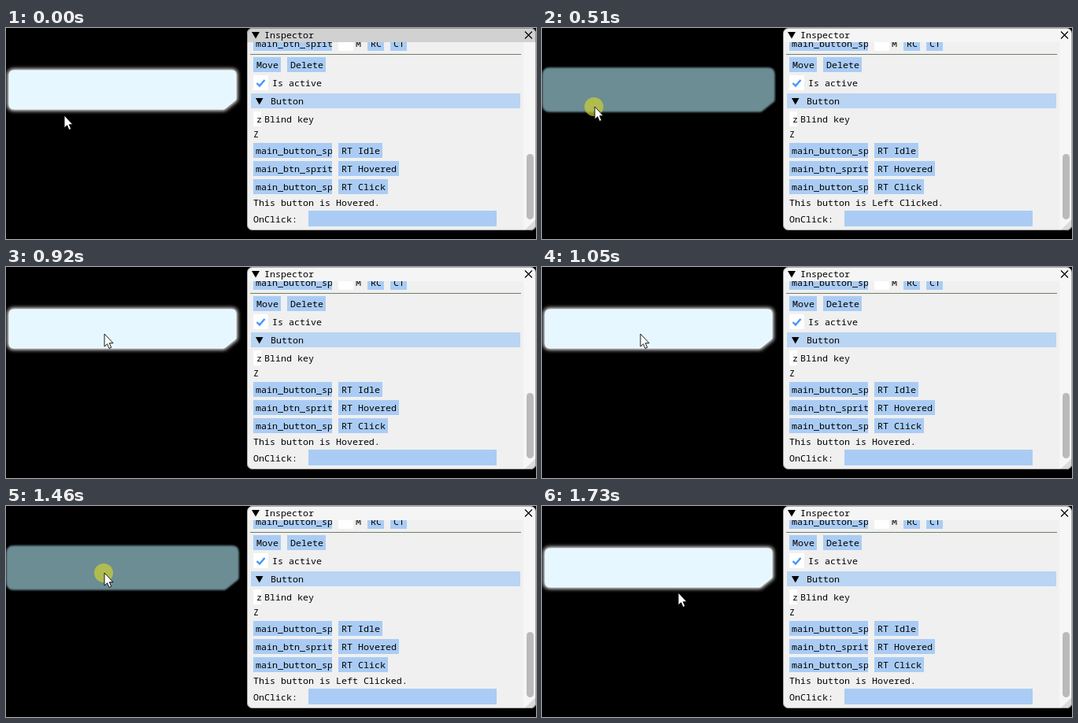
Write an HTML page that moves like this. It is 673x268 px and loops after 1780 ms.

```html
<!DOCTYPE html>
<html lang="en">
<head>
<meta charset="utf-8">
<title>Button inspector</title>
<style>
  html, body { margin: 0; width: 100%; height: 100%; overflow: hidden; background: #000; }
  svg { display: block; width: 673px; height: 268px; }
  text { font: 11.67px "Noto Sans Mono", monospace; fill: #000; white-space: pre; }
  .pressed { opacity: 0; }
</style>
</head>
<body>
<svg viewBox="0 0 673 268">
  <defs>
    <filter id="glow" x="-5%" y="-30%" width="110%" height="160%"><feGaussianBlur stdDeviation="2.6"/></filter>
    <filter id="soft" x="-5%" y="-30%" width="110%" height="160%"><feGaussianBlur stdDeviation="1"/></filter>
    <clipPath id="frame"><rect x="306" width="367" height="257" rx="7"/></clipPath>
    <clipPath id="body"><rect x="306" y="18" width="367" height="239"/></clipPath>
    <clipPath id="field"><rect x="314" y="18" width="100" height="239"/></clipPath>
    <path id="plate" d="M10 54H287Q292 54 292 59V91L277 103H10Q4 103 4 97V60Q4 54 10 54Z"/>
  </defs>

  <g class="idle">
    <use href="#plate" fill="#fff" stroke="#fff" stroke-width="4" filter="url(#glow)"/>
    <use href="#plate" fill="#e6f7ff" stroke="#f2fbff"/>
  </g>
  <g class="pressed">
    <use href="#plate" fill="#6c8d94" stroke="#6c8d94" stroke-width="7.5" stroke-linejoin="round" filter="url(#soft)"/>
  </g>

  <g clip-path="url(#frame)">
    <rect x="306" width="367" height="257" fill="#f0f0f0"/>
    <rect x="306" width="367" height="18" fill="#f5f5f5"/>
    <rect id="focus" x="306" width="367" height="18" fill="#d1d1d1"/>
    <path d="M312 5h10l-5 8.5z"/>
    <path d="M659 4.5l9 9m0-9l-9 9" stroke="#000" stroke-width="1.2"/>
    <rect x="657" y="18" width="16" height="239" fill="#f6f6f6"/>
    <rect x="661" y="160" width="9" height="83" rx="4.5" fill="#bababa"/>
    <path d="M673 243V257H658Z" fill="#dcdcdc"/>
    <g id="panel" clip-path="url(#body)"></g>
    <path d="M310 33.5H654" stroke="#6e7f6a"/>
    <path d="M317 89h9.5l-4.75 8.5z"/>
    <path d="M318.5 70l3.5 3.5 6.5-7.5" fill="none" stroke="#4296fa" stroke-width="2.4"/>
    <g id="labels"></g>
    <rect x="306.5" y=".5" width="366" height="256" rx="6.5" fill="none" stroke="#000" stroke-opacity=".3"/>
  </g>

  <g id="cursor">
    <circle class="pressed" cx="-1" r="12" fill="#cbce34" fill-opacity=".72"/>
    <path d="M0 0V16L3.6 12.7 6 18.4 8.7 17.3 6.3 11.7H11Z" fill="#fff" stroke="#000" stroke-width=".9"/>
  </g>
</svg>
<script>
const LOOP = 1780;
const BLUE = '#aaccf4', WHITE = '#fff', HEADER = '#bad4f3';
const panel = document.getElementById('panel');
const labels = document.getElementById('labels');

function add(parent, tag, attrs, content = '') {
  const el = document.createElementNS('http://www.w3.org/2000/svg', tag);
  for (const key in attrs) el.setAttribute(key, attrs[key]);
  el.textContent = content;
  return parent.appendChild(el);
}
const box = (x, y, width, height, fill) => add(panel, 'rect', { x, y, width, height, fill });
const label = (x, y, str, parent = labels) => add(parent, 'text', { x, y }, str);

function button(x, y, str) {
  box(x, y, str.length * 7 + 7, 19, BLUE);
  label(x + 4, y + 14, str, panel);
}
function fieldText(y, str) {
  const el = label(317, y + 14, str, panel);
  el.setAttribute('clip-path', 'url(#field)');
  return el;
}
function field(y, str) {
  box(314, y, 100, 19, BLUE);
  return fieldText(y, str);
}

const oldSprite = field(10, 'main_btn_sprite');
const newSprite = fieldText(10, 'main_button_sprite');
box(422, 10, 19, 19, WHITE);
label(444, 24, 'M', panel);
button(459, 10, 'RC');
button(488, 10, 'CT');
button(314, 37, 'Move');
button(357, 37, 'Delete');
box(314, 60, 19, 19, WHITE);
box(311, 83, 342, 19, HEADER);
box(314, 106, 10, 19, WHITE);
[['main_button_sprite', 'RT Idle'], ['main_btn_sprite', 'RT Hovered'], ['main_button_sprite', 'RT Click']]
  .forEach(([name, target], i) => {
    field(146 + 23 * i, name);
    button(422, 146 + 23 * i, target);
  });
box(384, 232, 239, 20, BLUE);

label(328, 13, 'Inspector');
label(338, 74, 'Is active');
label(336, 97, 'Button');
label(318, 120, 'z');
label(328, 120, 'Blind key');
label(314, 139, 'Z');
label(314, 247, 'OnClick:');
label(314, 226, 'This button is Hovered.').classList.add('idle');
label(314, 226, 'This button is Left Clicked.').classList.add('pressed');

function play(el, frames) {
  el.animate(frames, { duration: LOOP, iterations: Infinity }).startTime = 0;
}
// Hard switches: [time, visible]
function toggle(el, steps) {
  const frames = steps.map(([t, on]) => ({ offset: t / LOOP, opacity: on, easing: 'step-end' }));
  play(el, [...frames, { offset: 1, opacity: steps.at(-1)[1] }]);
}
const CLICK = 420;
const presses = [[0, 0], [CLICK, 1], [660, 0], [1130, 1], [1510, 0]];
document.querySelectorAll('.pressed').forEach(el => toggle(el, presses));
document.querySelectorAll('.idle').forEach(el => toggle(el, presses.map(([t, on]) => [t, 1 - on])));

// The first click also takes the focus from the panel
toggle(document.getElementById('focus'), [[0, 1], [CLICK, 0]]);
toggle(oldSprite, [[0, 1], [CLICK, 0]]);
toggle(newSprite, [[0, 0], [CLICK, 1]]);

// Pointer path: [time, x, y]
const path = [[0, 74, 111], [270, 67, 100], [660, 67, 100], [900, 125, 85], [1510, 125, 85], [1710, 173, 110], [LOOP, 173, 110]];
play(document.getElementById('cursor'), path.map(([t, x, y]) => ({
  offset: t / LOOP, transform: `translate(${x}px, ${y}px)`, easing: 'ease-in-out'
})));
</script>
</body>
</html>
```
